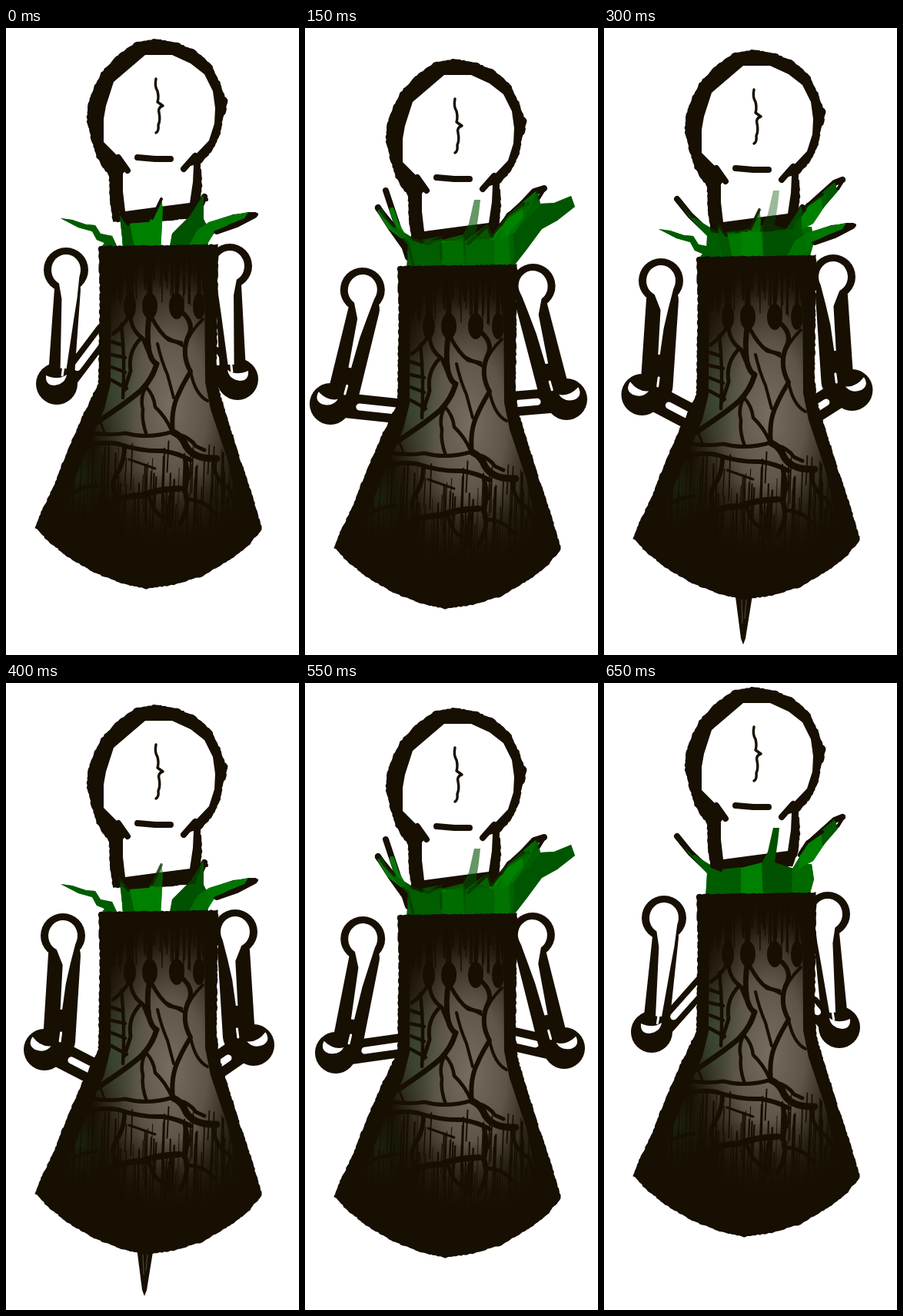
An HTML page with a canvas that plays this animation: 381 by 814 pixels, repeating every 0.7 s.

```html
<!DOCTYPE html>
<html lang="en">
<head>
<meta charset="utf-8">
<title>Skeleton loop</title>
<style>
  html, body { margin: 0; width: 100%; height: 100%; overflow: hidden; background: #fff; }
  canvas { display: block; width: 100vw; height: 100vh; }
</style>
</head>
<body>
<canvas id="stage" width="381" height="814"></canvas>
<script>
const INK = '#170f02', LOOP = 700, STEP = 50;
const stage = document.getElementById('stage');
const ctx = stage.getContext('2d');

let seed = 11;
const rnd = () => (seed = (seed * 16807) % 2147483647) / 2147483647;
const mix = (a, b, k) => a + (b - a) * k;

// Closed outline with a slightly serrated edge.
function rough(text) {
  const pts = text.split(' ').map(p => p.split(',').map(Number));
  const path = new Path2D();
  pts.forEach(([x, y], i) => {
    const [nx, ny] = pts[(i + 1) % pts.length];
    const n = Math.max(1, Math.round(Math.hypot(nx - x, ny - y) / 3));
    for (let k = 0; k < n; k++)
      path.lineTo(mix(x, nx, k / n) + rnd() * 1.4 - .7, mix(y, ny, k / n) + rnd() * 1.4 - .7);
  });
  path.closePath();
  return path;
}
function fill(g, color, path) { g.fillStyle = color; g.fill(path); }
function line(g, color, width, d) {
  g.strokeStyle = color;
  g.lineWidth = width;
  g.lineCap = g.lineJoin = 'round';
  g.stroke(new Path2D(d));
}
function blob(g, path) {
  fill(g, INK, path);
  g.strokeStyle = INK;
  g.lineWidth = 2;
  g.stroke(path);
}
function disc(g, color, x, y, rx, ry = rx) {
  g.fillStyle = color;
  g.beginPath();
  g.ellipse(x, y, rx, ry, 0, 0, 7);
  g.fill();
}
function glow(g, x, y, r, stretch, stops) {
  g.save();
  g.translate(x, y);
  g.scale(1, stretch);
  const grad = g.createRadialGradient(0, 0, 0, 0, 0, r);
  stops.forEach(([at, c]) => grad.addColorStop(at, c));
  g.fillStyle = grad;
  g.fillRect(-r, -r, 2 * r, 2 * r);
  g.restore();
}
function fade(g, y0, y1, c0, c1) {
  const grad = g.createLinearGradient(0, y0, 0, y1);
  grad.addColorStop(0, c0);
  grad.addColorStop(1, c1);
  g.fillStyle = grad;
  g.fillRect(0, Math.min(y0, y1), 381, Math.abs(y1 - y0));
}

const CLEAR = 'rgba(23,15,2,0)';
const TRUNK = '121,284 200,283 275,282 274,350 273,440 276,470 288,510 302,555 318,602 332,650 ' +
  '312,674 285,693 255,711 218,722 182,727 150,720 115,706 82,687 58,668 39,648 48,626 62,598 ' +
  '75,563 88,533 101,503 112,480 121,462 122,400 123,340';
const WINDOW = 'M137 296 L258 296 L259 460 L266 495 L288 560 L305 640 L296 668 L74 668 L66 645 L79 610 L106 545 L128 494 L136 462 Z';

const BRANCHES = [
  [7, 'M187 370 Q182 396 186 420 Q190 434 196 436 Q190 456 176 470 Q158 486 112 516'],
  [5, 'M190 377 Q200 396 212 405 L228 409'],
  [5, 'M161 372 Q154 386 139 397 M162 376 Q164 394 178 403 L184 418 M176 402 Q158 420 162 445 L154 470'],
  [6, 'M228 368 Q247 384 236 402 Q228 425 240 446 Q230 462 224 476 Q214 496 217 526'],
  [4, 'M197 410 Q202 432 210 450 L218 480 M256 378 Q238 395 233 414 L210 402 M240 446 Q246 476 262 484'],
  [4.5, 'M192 450 Q172 474 178 495 Q176 510 183 529 M182 466 Q192 476 194 492 Q208 505 216 524'],
  [4.5, 'M137 407 L152 412 M137 424 L155 428 M137 440 L155 447 M137 457 L157 468 M150 385 Q155 430 152 480'],
  [5, 'M104 524 Q130 530 155 526 Q185 534 217 524'],
  [6, 'M80 557 Q110 534 146 540 Q176 550 204 549 Q224 552 240 561'],
  [9, 'M218 525 Q229 530 234 543 Q244 560 274 559'],
  [5, 'M222 527 Q240 532 247 543 L258 548'],
  [6, 'M154 544 Q154 560 147 574 Q135 590 142 606 L139 630 M233 560 Q238 580 233 600 Q240 620 226 645'],
  [8, 'M112 630 Q145 607 176 607 Q196 599 226 598'],
  [5, 'M75 612 Q92 596 118 594 M186 606 Q190 630 208 637 M270 562 Q270 586 290 598 L302 626 M234 612 Q258 612 274 632'],
  [3, 'M120 505 L128 525 M160 560 L194 572']
];

function makeTrunk() {
  const c = document.createElement('canvas');
  c.width = 381;
  c.height = 760;
  const g = c.getContext('2d');
  blob(g, rough(TRUNK));
  g.save();
  g.clip(new Path2D(WINDOW));
  glow(g, 214, 488, 106, 1.95, [[0, '#766c60'], [.45, '#5e5549'], [.78, '#2c2417'], [1, INK]]);
  glow(g, 140, 465, 48, 1.7, [[0, 'rgba(58,80,52,.7)'], [1, 'rgba(58,80,52,0)']]);
  glow(g, 95, 588, 46, 1.1, [[0, 'rgba(30,48,20,.6)'], [1, 'rgba(30,48,20,0)']]);
  glow(g, 285, 600, 36, 1.3, [[0, 'rgba(32,46,22,.5)'], [1, 'rgba(32,46,22,0)']]);
  fade(g, 296, 345, INK, CLEAR);
  fade(g, 668, 575, INK, CLEAR);
  for (let i = 0; i < 46; i++) {
    const x = 136 + rnd() * 124;
    line(g, INK, 1 + rnd() * 2, `M${x} 296 L${x + rnd() * 4 - 2} ${320 + rnd() * 42}`);
  }
  for (let i = 0; i < 115; i++) {
    const x = 70 + rnd() * 240, top = 535 + rnd() * 85;
    line(g, INK, .7 + rnd() * 1.8, `M${x + 2} ${top} L${x} ${top + 35 + rnd() * 45}`);
  }
  BRANCHES.forEach(([w, d]) => line(g, INK, w, d));
  [161, 187, 222, 251].forEach((x, i) => {
    disc(g, INK, x, 361, i % 3 ? 10 : 8, 17);
    line(g, INK, 5, `M${x} 300 L${x} 352`);
  });
  g.restore();
  return c;
}

// Three drawings of the collar: ink strokes under, fills, ink strokes over.
const LEAVES = {
  A: {
    under: [8, 'M150 241 L158 254 L186 251 L200 226 M258 219 L247 245 M270 255 L296 246 L323 243 L300 255 L274 264'],
    fills: [
      ['#005c00', 'M71 247 L86 249 L104 255 L116 256 L123 267 L138 270 L147 289 L121 289 L128 279 L118 275 L112 264 L94 259 Z'],
      ['#008000', 'M149 240 L160 254 L186 252 L202 219 L204 236 L201 289 L152 289 Z'],
      ['#005000', 'M147 237 L161 255 L168 289 L153 289 Z'],
      ['#005300', 'M257 216 L257 248 L264 262 L262 289 L212 289 L216 267 L239 244 Z'],
      ['#007800', 'M264 252 L290 244 L315 239 L310 247 L294 253 L272 264 L262 280 L238 282 L249 262 Z']
    ],
    over: [4, 'M149 241 L159 255 M316 241 L326 242 M272 265 L296 256 L318 246 M258 217 L261 223 M190 247 L202 222']
  },
  B: {
    under: [8, 'M105 185 L114 212 L134 272 M95 207 L112 234 L132 262 M268 218 L298 186 L311 182 M246 248 L242 224'],
    fills: [
      ['#006200', 'M135 289 L132 244 L150 249 L178 244 L178 289 Z'],
      ['#004e00', 'M177 289 L177 254 L208 246 L210 289 Z'],
      ['#008400', 'M207 289 L209 250 L238 228 L243 242 L262 218 L300 186 L306 204 L272 240 L268 289 Z'],
      ['#005600', 'M267 289 L265 240 L292 210 L302 184 L306 202 L324 201 L346 192 L351 206 L328 224 L308 235 L288 262 Z']
    ],
    over: [4, 'M138 247 L160 254 L176 246 M177 256 L178 274 M212 254 L238 230 L242 244 L262 220 L290 202 M133 252 L141 283'],
    bright: [6, 'M113 210 L119 228 L128 244 M98 212 L110 232 L126 244']
  },
  C: {
    under: [8, 'M95 208 L112 229 L134 250 M256 232 L272 212 L300 187 L310 183'],
    fills: [
      ['#005c00', 'M132 289 L134 256 L110 230 L94 206 L103 216 L120 234 L138 245 L152 251 L179 248 L179 289 Z'],
      ['#008000', 'M178 289 L178 249 L206 242 L209 289 Z'],
      ['#005200', 'M207 289 L205 243 L213 228 L220 197 L228 197 L226 215 L222 242 L247 250 L246 289 Z'],
      ['#006a00', 'M244 289 L245 250 L256 232 L262 244 L270 244 L273 264 L266 289 Z'],
      ['#008000', 'M253 250 L256 224 L276 207 L290 199 L288 216 L272 240 Z'],
      ['#005800', 'M284 221 L282 201 L300 186 L304 198 Z']
    ],
    over: [4, 'M95 206 L103 218 L116 231 M302 187 L312 182 L304 195 M140 247 L152 252 M255 230 L264 216 L284 202']
  }
};
for (const leaf of Object.values(LEAVES))
  leaf.fills = leaf.fills.map(([c, d]) => [c, new Path2D(d)]);

function drawLeaf(leaf, front) {
  if (!front) line(ctx, INK, ...leaf.under);
  leaf.fills.forEach(([c, p]) => fill(ctx, c, p));
  if (leaf.bright) line(ctx, '#087808', ...leaf.bright);
  line(ctx, INK, ...leaf.over);
}

// Collar drawing and its strength in tenths, one entry per step.
const COLLAR = ['A9', 'A6B6', 'B9C4', 'B6C6', 'C9', 'C5A7', 'C4A8', 'A7', 'A6', 'A5B7', 'B9C4', 'B7C6', 'C9', 'C9'];

function collar(step, front) {
  const marks = COLLAR[step].match(/../g);
  // Solid behind the skull, only a tint in front of it.
  (front ? marks : marks.slice().reverse()).forEach(([name, level]) => {
    ctx.globalAlpha = front ? (level === '9' ? 1 : level / 10) : 1;
    drawLeaf(LEAVES[name], front);
  });
  ctx.globalAlpha = 1;
}

const SKULL = rough('168,20 195,15 222,20 246,30 266,48 277,70 281,84 287,94 285,108 280,122 278,137 268,158 ' +
  '252,176 254,205 251,230 244,246 210,249 175,250 140,251 136,225 135,192 119,168 112,145 106,122 107,100 ' +
  '115,78 125,58 146,36');
const FACE = new Path2D('M181 35 L216 35 L240 46 L258 60 L269 82 L272 104 L271 124 L264 146 L244 167 L232 181 ' +
  'L244 178 L243 200 L239 227 L200 232 L155 238 L152 212 L152 189 L158 182 L150 171 L127 148 L127 118 L130 101 L140 70 Z');

function skull() {
  blob(ctx, SKULL);
  fill(ctx, '#fff', FACE);
  line(ctx, INK, 8, 'M146 168 L158 185 M246 166 L231 183');
  line(ctx, INK, 8, 'M171 168 L194 170 L214 170');
  line(ctx, INK, 3.4, 'M195 66 Q193 76 197 82 Q199 90 197 96 L204 101 Q197 103 199 110 Q201 120 198 126 Q199 134 195 136');
}

// Shoulder, elbow and wrist points; thin is 0 for the wide bone, 1 for the narrow one.
function arm(sx, sy, ex, ey, fx, fy, thin) {
  const hx = ex + 6 + 13 * thin, hy = ey - 4;
  const bx = ex + 10, by = ey + 2;
  const len = Math.hypot(fx - bx, fy - by);
  const ux = (fx - bx) / len, uy = (fy - by) / len;
  line(ctx, INK, 24 + 10 * thin, `M${bx} ${by} L${fx} ${fy}`);
  line(ctx, '#fff', 9, `M${bx + ux * 28} ${by + uy * 28} L${fx} ${fy}`);
  line(ctx, INK, 34 + 8 * thin, `M${sx + 2} ${sy + 25} L${hx} ${hy - 6}`);
  disc(ctx, INK, sx, sy, 29);
  disc(ctx, INK, ex, ey + 1, 27);
  ctx.save();
  ctx.translate(sx, sy);
  ctx.rotate(Math.atan2(sx - hx, hy - sy));
  disc(ctx, '#fff', 0, 0, 19, 20);
  const at = (a, b) => mix(a, b, thin);
  fill(ctx, '#fff', new Path2D(`M-9 15 L18 4 L${at(16, 11)} 36 L${at(13, 6)} 62 L${at(6, 2.5)} ${at(128, 96)} ` +
    `L${at(-2, 0)} ${at(128, 96)} L${at(-4, 1)} 38 Z`));
  line(ctx, '#fff', 3, 'M2 126 L1 137');
  ctx.restore();
  ctx.save();
  ctx.translate(ex - 7 * thin, ey - 2);
  ctx.rotate(.5 * thin);
  fill(ctx, '#fff', new Path2D('M-14 -8 Q-15 5 -3 5 Q11 3 13 -9 Q2 -1 -14 -8 Z'));
  ctx.restore();
}

function spike(tip) {
  if (tip < 728) return;
  const c = Math.min(181, 174 + (tip - 770) * .5), half = 8 + Math.max(0, tip - 765) * .15;
  fill(ctx, INK, new Path2D(`M${c - half} 715 L${c + half + 2} 715 L${c + 3} ${tip - 8} L${c} ${tip} L${c - 3} ${tip - 8} Z`));
  if (tip > 768) line(ctx, '#4a4438', 1.2, `M${c - 2} 728 L${c - 1} ${tip - 28} M${c + 4} 728 L${c + 2} ${tip - 34}`);
}

// time, lift, left elbow, right elbow, left wrist y, right wrist y, bone thinness, spike tip
const POSES = [
  [0, 0, 66, 301, 394, 425, 0, 700],
  [100, 20, 42, 328, 447, 444, .7, 700],
  [150, 26, 33, 340, 472, 462, .8, 715],
  [250, 18, 47, 325, 498, 482, 1, 772],
  [350, 10, 52, 320, 500, 486, 1, 801],
  [400, 14, 50, 322, 498, 486, 1, 782],
  [500, 31, 29, 352, 478, 469, .85, 700],
  [550, 18, 40, 337, 452, 444, .7, 700],
  [650, -9, 62, 306, 400, 427, 0, 700],
  [700, 0, 66, 301, 394, 425, 0, 700]
];
function poseAt(t) {
  const i = POSES.findIndex(p => p[0] > t);
  const a = POSES[i - 1], b = POSES[i];
  return a.map((v, n) => mix(v, b[n], (t - a[0]) / (b[0] - a[0])));
}

const trunk = makeTrunk();

function draw(step) {
  const [, lift, leftX, rightX, leftY, rightY, thin, tip] = poseAt(step * STEP);
  ctx.setTransform(1, 0, 0, 1, 0, 0);
  ctx.fillStyle = '#fff';
  ctx.fillRect(0, 0, 381, 814);
  ctx.translate(0, lift);
  arm(78 - 4 * thin, 314, leftX, 461, 128, leftY, thin);
  ctx.save();
  ctx.translate(372, 0);
  ctx.scale(-1, 1);
  arm(81 - 7 * thin, 309, 372 - rightX, 455, 102, rightY, thin);
  ctx.restore();
  collar(step, false);
  skull();
  collar(step, true);
  spike(tip);
  ctx.drawImage(trunk, 0, 0);
}

let shown = -1;
function tick() {
  const step = Math.floor(performance.now() % LOOP / STEP);
  if (step !== shown) draw(shown = step);
  requestAnimationFrame(tick);
}
tick();
</script>
</body>
</html>
```
